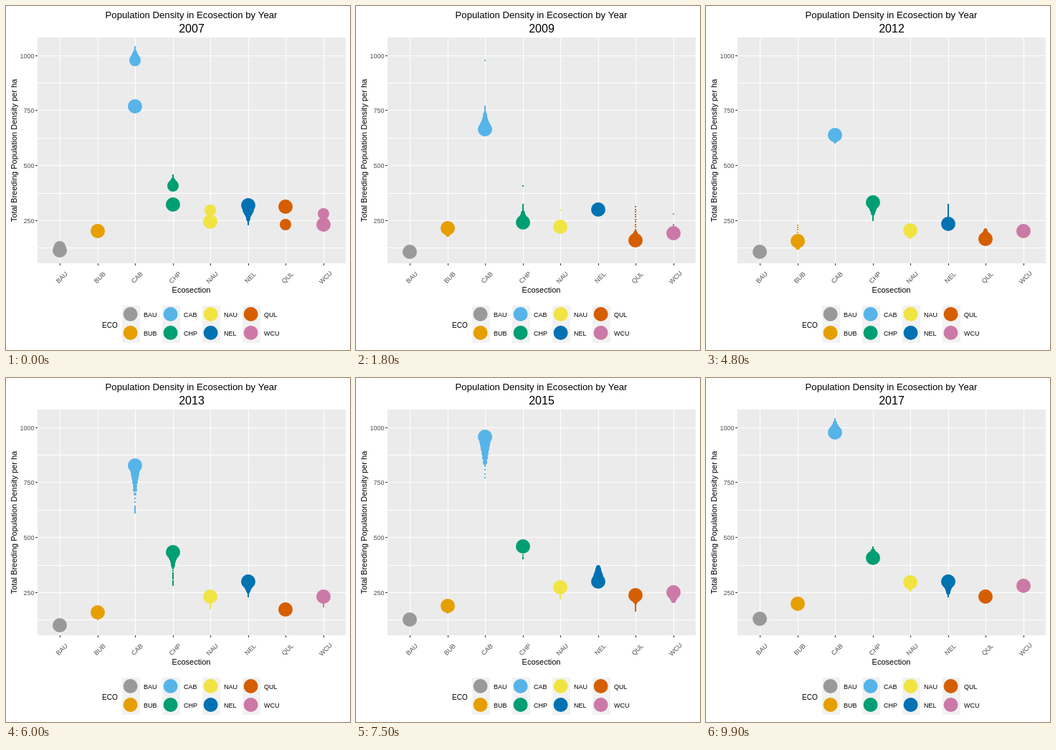
Animation, 480 px wide and 480 px high, one loop 10 s. Source, as an HTML page with a canvas:

```html
<!DOCTYPE html>
<html lang="en">
<head>
<meta charset="utf-8">
<title>Population Density in Ecosection by Year</title>
<style>
html, body { margin: 0; width: 100%; height: 100%; overflow: hidden; background: #fff; }
canvas { display: block; width: 480px; height: 480px; }
</style>
</head>
<body>
<canvas id="stage" width="480" height="480"></canvas>
<script>
const ctx = document.getElementById('stage').getContext('2d');
const FRAMES = 100, STEP = 100, YEARS = 10, WAKE = 20;
const FONT = '"Liberation Sans", Arial, sans-serif';

// Height of each group on the stage, one key per year; a gap lies midway between its neighbours
const groups = [
  { name: 'BAU', color: '#999999', ys: [341, 336, 345, 334, , 344, 345, , 335, 340, 336] },
  { name: 'BUB', color: '#E69F00', ys: [314, 320, 307, 306, 338, 327, 328, , 315, , 315] },
  { name: 'CAB', color: '#56B4E9', ys: [140, 149, 178, 191, 189, 179, 122.5, 117, 58, 57, 76] },
  { name: 'CHP', color: '#009E73', ys: [277, 287, 306, , 291, 272, 244, 234, , 237, 251] },
  { name: 'NAU', color: '#F0E442', ys: [301, , 309, 311, 323, 312, 306, , 288, 297, 285] },
  { name: 'NEL', color: '#0072B2', ys: [278, , 285, 277, 297, 305, 286, 264, 297, 305, 284] },
  { name: 'QUL', color: '#D55E00', ys: [280, 315, 330, 318, 312, 327, 324, , 298, , 305] },
  { name: 'WCU', color: '#CC79A7', ys: [305, , 318, 311, 320, 313, 304, 311, 291, , 290] }
];
for (const { ys } of groups) {
  for (let k = 1; k < YEARS; k++) ys[k] ??= (ys[k - 1] + ys[k + 1]) / 2;
}

const colX = i => Math.round(75 + i * 52.55);
const yearFrame = k => Math.ceil(k * (FRAMES - 1) / YEARS - 0.5);

function rect(x, y, w, h, color) {
  ctx.fillStyle = color;
  ctx.fillRect(x, y, w, h);
}

function dot(x, y, r, color) {
  if (r < 2) return rect(x - 1, y - 1, 2, 2, color);
  ctx.fillStyle = color;
  ctx.beginPath();
  ctx.arc(x, y, r, 0, Math.PI * 2);
  ctx.fill();
}

function label(str, x, y, size, align = 'center', color = '#000', turn = 0) {
  ctx.save();
  ctx.translate(x, y);
  ctx.rotate(turn);
  ctx.font = `${size}px ${FONT}`;
  ctx.textAlign = align;
  ctx.fillStyle = color;
  ctx.fillText(str, 0, 0);
  ctx.restore();
}

function valueAt(ys, frame) {
  let k = 0;
  while (k < YEARS - 1 && frame >= yearFrame(k + 1)) k++;
  const from = yearFrame(k);
  const u = (frame - from) / (yearFrame(k + 1) - from);
  return ys[k] + (ys[k + 1] - ys[k]) * u;
}

function drawPanel() {
  rect(44, 44, 430, 315, '#EBEBEB');
  for (let i = 0; i < 4; i++) {
    const y = Math.floor(69.3 + i * 76.6);
    rect(44, y, 430, 1, '#fff');
    rect(44, Math.round(107.4 + i * 76.6), 430, 1, '#fff');
    rect(41, y, 3, 1, '#333');
    label(1000 - i * 250, 39.5, y + 4, 9, 'right', '#4D4D4D');
  }
  groups.forEach((g, i) => {
    const x = colX(i);
    rect(x, 44, 1, 315, '#fff');
    rect(x, 359, 1, 3, '#333');
    label(g.name, x + 5, 381, 9, 'center', '#4D4D4D', -Math.PI / 4);
  });
}

function drawLegend() {
  label('ECO', 134, 449, 10, 'left');
  groups.forEach((g, i) => {
    const x = 173.6 + Math.floor(i / 2) * 56;
    const y = 430 + (i % 2) * 26;
    rect(Math.round(x) - 12, y - 12, 25, 26, '#F2F2F2');
    dot(x, y, 10, g.color);
    label(g.name, x + 18.4, y + 4, 9, 'left');
  });
}

// Each point drags a wake whose radius falls off with the cube of its age, in whole pixels
function drawPoints(frame) {
  groups.forEach((g, i) => {
    for (let age = WAKE - 1; age >= 0; age--) {
      const past = (frame - age + FRAMES) % FRAMES;
      const r = Math.max(1, Math.floor(0.3 + 10 * (1 - age / WAKE) ** 3));
      dot(colX(i), Math.round(valueAt(g.ys, past)), r, g.color);
    }
  });
}

function draw(frame) {
  rect(0, 0, 480, 480, '#fff');
  drawPanel();
  drawPoints(frame);
  label('Population Density in Ecosection by Year', 258.5, 17, 13.2);
  label(Math.round(2007 + frame * YEARS / (FRAMES - 1)), 259, 37, 16);
  label('Ecosection', 258.5, 400, 11);
  label('Total Breeding Population Density per ha', 15, 201.5, 11, 'center', '#000', -Math.PI / 2);
  drawLegend();
}

const start = performance.now();
function tick() {
  draw(Math.floor((performance.now() - start) / STEP) % FRAMES);
  requestAnimationFrame(tick);
}
tick();
</script>
</body>
</html>
```
